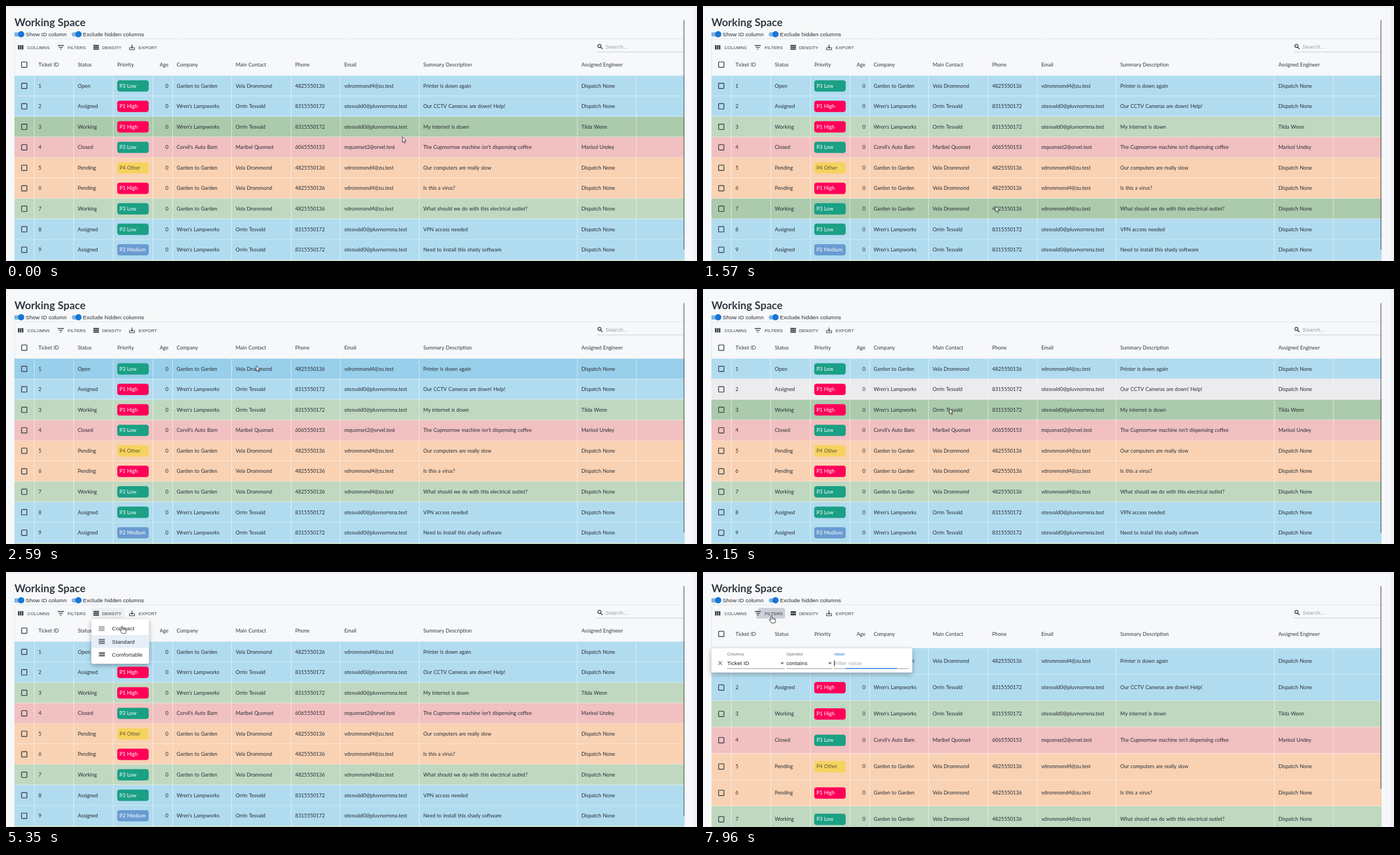
An HTML page with a canvas that plays this animation: 1230 px wide and 455 px high, repeating every 8 s.

```html
<!DOCTYPE html>
<html lang="en">
<head>
<meta charset="utf-8">
<title>Working Space</title>
<style>
  html, body { margin: 0; width: 100%; height: 100%; overflow: hidden; background: #f6f8fa; }
  canvas { display: block; }
</style>
</head>
<body>
<canvas id="stage" width="1230" height="455"></canvas>
<script>
const ctx = document.getElementById('stage').getContext('2d');
const LOOP = 8000;
const DARK = '#343842', BLUE = '#1976d2';
const TABLE_FONT = '9.1px Lato, sans-serif';
const UI_FONT = '9.84px "Liberation Sans", Arial, sans-serif';
const BUTTON_FONT = '7.85px "Liberation Sans", Arial, sans-serif';
const LABEL_FONT = '7.4px "Liberation Sans", Arial, sans-serif';
const GRID_LEFT = 15, GRID_RIGHT = 1208, HEADER_TOP = 85;

const COLUMNS = [
  ['Ticket ID', 50.5], ['Status', 120.5], ['Priority', 191], ['Age', 261.5], ['Company', 296.5],
  ['Main Contact', 401.5], ['Phone', 507.5], ['Email', 595], ['Summary Description', 735.5],
  ['Assigned Engineer', 1017], ['', 1122]
];
const AGE = 3, AGE_RIGHT = 289;

const CLIENTS = {
  garden: ['Garden to Garden', 'Vela Drommond', '4825550136', 'vdrommond4@zu.test'],
  lamp: ["Wren's Lampworks", 'Orrin Tesvald', '8315550172', 'otesvald0@pluvnorrena.test'],
  auto: ["Corvil's Auto Barn", 'Maribel Quonset', '6065550153', 'mquonset2@orvel.test']
};
const NONE = 'Dispatch None';
const TICKETS = [
  ['Open', 'P3 Low', 'garden', 'Printer is down again', NONE],
  ['Assigned', 'P1 High', 'lamp', 'Our CCTV Cameras are down! Help!', NONE],
  ['Working', 'P1 High', 'lamp', 'My internet is down', 'Tilda Wenn'],
  ['Closed', 'P3 Low', 'auto', "The Cupmorrow machine isn't dispensing coffee", 'Marisol Undey'],
  ['Pending', 'P4 Other', 'garden', 'Our computers are really slow', NONE],
  ['Pending', 'P1 High', 'garden', 'Is this a virus?', NONE],
  ['Working', 'P3 Low', 'garden', 'What should we do with this electrical outlet?', NONE],
  ['Assigned', 'P3 Low', 'lamp', 'VPN access needed', NONE],
  ['Assigned', 'P2 Medium', 'lamp', 'Need to install this shady software', NONE],
  ['Working', 'P3 Low', 'garden', 'Keyboard is sticky', NONE]
];
// normal and hovered row colours
const STATUS_COLORS = {
  Open: ['#b1dcf0', '#98cfea'], Assigned: ['#b1dcf0', '#98cfea'],
  Working: ['#c0d8c0', '#abcbac'], Closed: ['#f1c0c0', '#ecaaaa'], Pending: ['#f9d2b3', '#f6c096']
};
const CHIP_COLORS = { P1: '#ff0059', P2: '#6a9bd1', P3: '#1ba085', P4: '#f6d35f' };

// pointer path: time, x, y
const PATH = [
  [0, 705, 233], [160, 705, 233], [520, 640, 395], [950, 562, 172], [1020, 558, 167],
  [1780, 505, 400], [1870, 498, 398], [2270, 460, 231], [2750, 442, 118], [2990, 442, 118],
  [3150, 438, 212], [3430, 415, 325], [3800, 300, 130], [3920, 268, 105], [4470, 186, 72],
  [4960, 186, 72], [5510, 212, 103], [5670, 212, 103], [6140, 195, 142], [6500, 195, 142],
  [7170, 125, 81], [7240, 125, 81], [7410, 122, 78], [LOOP, 122, 78]
];
const DENSITY_CLICK = 4960, ITEM_CLICK = 6380, FILTER_CLICK = 7800;

const clamp = v => Math.max(0, Math.min(1, v));
const ramp = (t, start, length) => clamp((t - start) / length);
const slope = (i, axis) => PATH[i] && PATH[i + 1]
  ? (PATH[i + 1][axis] - PATH[i][axis]) / (PATH[i + 1][0] - PATH[i][0]) : 0;

function tangent(i, axis) {
  const a = slope(i - 1, axis), b = slope(i, axis);
  return a * b <= 0 ? 0 : 2 * a * b / (a + b);
}

// smooth monotone curve through the path points
function pointerAt(t) {
  let i = 0;
  while (i < PATH.length - 2 && PATH[i + 1][0] <= t) i++;
  const span = PATH[i + 1][0] - PATH[i][0], u = clamp((t - PATH[i][0]) / span);
  const ease = u * u * (3 - 2 * u);
  const [x, y] = [1, 2].map(axis =>
    PATH[i][axis] + (PATH[i + 1][axis] - PATH[i][axis]) * ease +
    span * (tangent(i, axis) * u * (1 - u) ** 2 - tangent(i + 1, axis) * u * u * (1 - u)));
  return { x, y };
}

function text(str, x, y, color = DARK, font = TABLE_FONT, align = 'left') {
  const lato = font.includes('Lato');
  ctx.font = font;
  ctx.letterSpacing = lato ? '0px' : '0.1px';
  ctx.wordSpacing = lato ? '0.4px' : '0px';
  ctx.textAlign = align;
  ctx.fillStyle = color;
  ctx.fillText(str, x, y);
}

function rect(x, y, w, h, color, radius = 0) {
  ctx.fillStyle = color;
  ctx.beginPath();
  ctx.roundRect(x, y, w, h, radius);
  ctx.fill();
}

function stroke(path, color, width) {
  ctx.strokeStyle = color;
  ctx.lineWidth = width;
  ctx.stroke(new Path2D(path));
}

function fill(path, color) {
  ctx.fillStyle = color;
  ctx.fill(new Path2D(path));
}

function circle(x, y, r, color) {
  ctx.fillStyle = color;
  ctx.beginPath();
  ctx.arc(x, y, r, 0, Math.PI * 2);
  ctx.fill();
}

function paper(x, y, w, h) {
  ctx.save();
  ctx.shadowColor = 'rgba(0,0,0,.32)';
  ctx.shadowBlur = 8;
  ctx.shadowOffsetY = 3;
  rect(x, y, w, h, '#fff', 3);
  ctx.restore();
}

function ripple(age, x, y, box, alpha) {
  if (age < 0 || alpha <= 0) return;
  ctx.save();
  ctx.beginPath();
  ctx.roundRect(...box, 3);
  ctx.clip();
  circle(x, y, age * 0.165, `rgba(54,62,88,${alpha})`);
  ctx.restore();
}

function bars(x, y, count, height, pitch, color = DARK, width = 10) {
  for (let i = 0; i < count; i++) rect(x, y + i * pitch, width, height, color);
}

const checkbox = y => {
  ctx.strokeStyle = '#3c414b';
  ctx.lineWidth = 1.4;
  ctx.beginPath();
  ctx.roundRect(27.7, y - 4.8, 9.6, 9.6, 1);
  ctx.stroke();
};

function toggle(x, label) {
  rect(x, 47, 17, 7.5, '#7db4e6', [x > 20 ? 3.7 : 0, 3.7, 3.7, x > 20 ? 3.7 : 0]);
  circle(x + 12, 50.4, 5.6, BLUE);
  text(label, x + 20, 54, '#24272d', UI_FONT);
}

function drawPage(comfortable) {
  rect(0, 0, 1230, 455, '#eef1f5');
  rect(-5, 3, 1229, 460, '#f6f8fa', 4);
  text('Working Space', 15, 36, DARK, 'bold 18.9px Lato, sans-serif');
  toggle(15, 'Show ID column');
  toggle(117, 'Exclude hidden columns');
  stroke('M15.5 455V58.5H1208', '#e2e6ea', 1);
}

function drawToolbar(t, comfortable) {
  ripple(t - DENSITY_CLICK, 186, 73, [151, 64, 60, 19], 0.22 * (1 - ramp(t, 5150, 250)));
  ripple(t - FILTER_CLICK, 122, 78, [88, 64, 58, 19], 0.22);
  for (let i = 0; i < 3; i++) rect(21.3 + i * 3.5, 69.8, 2.6, 7.8, DARK);
  text('COLUMNS', 38, 77, DARK, BUTTON_FONT);
  stroke('M92 70.5H103M94 73.8H101M96.3 77.1H98.8', DARK, 1.3);
  text('FILTERS', 109.7, 77, DARK, BUTTON_FONT);
  if (comfortable) bars(156, 70, 2, 3.2, 4.1, DARK, 9.5);
  else bars(155.5, 69.5, 3, 2.2, 3.1);
  text('DENSITY', 171, 77, DARK, BUTTON_FONT);
  stroke('M220 73.5V78H228.7V73.5M224.3 68.8V75M221.9 73L224.3 75.4L226.7 73', DARK, 1.2);
  text('EXPORT', 236, 77, DARK, BUTTON_FONT);
  ctx.beginPath();
  ctx.arc(1056.3, 71.2, 2.8, 0, Math.PI * 2);
  ctx.strokeStyle = DARK;
  ctx.lineWidth = 1.3;
  ctx.stroke();
  stroke('M1058.3 73.2L1061.7 76.6', DARK, 1.5);
  text('Search…', 1067, 76, '#9b9fa6', UI_FONT);
  rect(1052, 81.5, 155, 1, '#c9ccd1');
}

function drawHeader(bottom, pointer) {
  const y = (HEADER_TOP + bottom) / 2;
  const hovered = pointer && pointer.y > HEADER_TOP && pointer.y < bottom;
  checkbox(y);
  COLUMNS.forEach(([title, left], i) => {
    const right = i < COLUMNS.length - 1 ? COLUMNS[i + 1][1] : GRID_RIGHT;
    const active = hovered && title && pointer.x >= left && pointer.x < right;
    if (hovered) rect(left - 0.1, y - 5.2, 1.3, 10.8, DARK);
    if (active) {
      const dotX = i === AGE ? left + 9 : right - 9;
      [-4, 0, 4].forEach(dy => circle(dotX, y + dy, 1, DARK));
    }
    if (i !== AGE) text(title, left + 7.2, y + 3.2);
    else if (!active) text(title, AGE_RIGHT, y + 3.2, DARK, TABLE_FONT, 'right');
  });
}

function drawRow(ticket, index, top, height, color) {
  const [status, priority, client, summary, engineer] = ticket;
  const y = top + height / 2 - 0.1, base = y + 3.2, ink = '#272c33';
  rect(GRID_LEFT, top, GRID_RIGHT - GRID_LEFT, height + 0.5, color);
  rect(GRID_LEFT, top + height - 0.8, GRID_RIGHT - GRID_LEFT, 0.9, 'rgba(248,249,250,.75)');
  COLUMNS.forEach(([, left]) => rect(left - 0.5, top, 1, height, 'rgba(248,249,250,.65)'));
  checkbox(y);
  const cells = [index + 1, status, null, null, ...CLIENTS[client], summary, engineer];
  cells.forEach((cell, i) => {
    if (cell !== null) text(cell, COLUMNS[i][1] + 7.3, base, ink);
  });
  text('0', AGE_RIGHT, base, ink, TABLE_FONT, 'right');
  rect(198, y - 10, 56, 20.2, CHIP_COLORS[priority.slice(0, 2)], 4.2);
  text(priority, 202, base, priority.startsWith('P4') ? '#5e5433' : '#fff');
}

function drawRows(t, top, height, pointer) {
  TICKETS.forEach((ticket, i) => {
    const y = top + i * height;
    if (y > 455) return;
    const hovered = pointer && pointer.y >= y && pointer.y < y + height;
    const flashing = i === 1 && t >= 3120 && t < 3210;
    drawRow(ticket, i, y, height, flashing ? '#ececee' : STATUS_COLORS[ticket[0]][hovered ? 1 : 0]);
  });
}

function drawMenu(t, comfortable) {
  const alpha = ramp(t, 5030, 200) * (1 - ramp(t, 6510, 180));
  if (!alpha) return;
  ctx.save();
  ctx.globalAlpha = alpha;
  paper(152, 84, 102.5, 79.7);
  rect(152, comfortable ? 135.5 : 112.5, 102.5, 23, '#e6eef8');
  ripple(t - ITEM_CLICK, 195, 147, [152, 135.5, 102.5, 23], 0.17);
  const gray = '#6f7277';
  bars(165, 96.8, 4, 1.1, 2.4, gray, 10.5);
  bars(165, 119.5, 3, 2.3, 3.3, gray, 11);
  bars(165.5, 143, 2, 3.4, 4.3, gray, 10.5);
  ['Compact', 'Standard', 'Comfortable'].forEach((label, i) =>
    text(label, 188.5, 104.4 + i * 23.2, '#22252a', UI_FONT));
  ctx.restore();
}

function drawFilterPanel(t) {
  const shown = ramp(t, 7860, 100);
  if (!shown) return;
  ctx.save();
  ctx.globalAlpha = shown;
  paper(15, 136, 357.5, 43.5);
  stroke('M27.3 159.2L33.9 165.8M33.9 159.2L27.3 165.8', '#65686d', 1.2);
  [['Columns', 'Ticket ID', 43, 102], ['Operator', 'contains', 148.5, 81.5], ['Value', '', 233, 133]]
    .forEach(([label, value, x, width]) => {
      text(label, x, 148.5, value ? '#6a6d72' : BLUE, LABEL_FONT);
      text(value, x, 166.2, '#1c1e22', UI_FONT);
      rect(x, 172, width, 1, '#96999d');
      if (value) fill(`M${x + width - 7.3} 161.6h6.6l-3.3 3.3z`, '#686b70');
    });
  text('Filter value', 233.5, 166.2, '#a5a8ac', UI_FONT);
  rect(233.3, 157.5, 1, 10.5, '#1c1e22');
  const half = 66.5 * (1 - (1 - ramp(t, 7860, 200)) ** 1.65);
  rect(299.7 - half, 171.6, half * 2, 1.5, BLUE);
  ctx.restore();
}

function drawPointer({ x, y }, hand) {
  ctx.save();
  ctx.translate(x, y);
  ctx.lineJoin = 'round';
  const shape = hand
    ? 'M-1.2 1Q-1.2 0 0 0T1.2 1V4.6Q2.2 3.9 3.3 4.8Q4.4 4.3 5.3 5.3Q7 5 7 6.8V9.2Q7 11.2 5.8 13H-.4Q-1.2 11-4 7.9Q-4.4 6.5-3 6.5L-1.2 8Z'
    : 'M.5 .5V10.2L2.7 8.2L4.3 11.8L6 11L4.4 7.5H7.3Z';
  fill(shape, '#fff');
  stroke(shape, '#25282e', 0.9);
  if (hand) stroke('M1.2 4.6V7M3.3 4.8V7.2M5.3 5.3V7.4', '#25282e', 0.6);
  ctx.restore();
}

function draw(t) {
  const comfortable = t >= ITEM_CLICK;
  const headerBottom = comfortable ? 135.8 : 124.3;
  const rowHeight = comfortable ? 47 : 36.55;
  const menuOpen = t > DENSITY_CLICK && t < 6690;
  const hover = menuOpen ? null : pointerAt(t - 15);
  drawPage();
  drawToolbar(t, comfortable);
  drawHeader(headerBottom, hover);
  drawRows(t, headerBottom, rowHeight, hover);
  rect(1206, 25, 1.4, comfortable ? 362 : 410, '#666b72', 0.7);
  drawMenu(t, comfortable);
  drawFilterPanel(t);
  drawPointer(pointerAt(t), t > 3880 && !(t > 6750 && t < 7000));
}

function frame(now) {
  draw(now % LOOP);
  requestAnimationFrame(frame);
}
requestAnimationFrame(frame);
</script>
</body>
</html>
```
